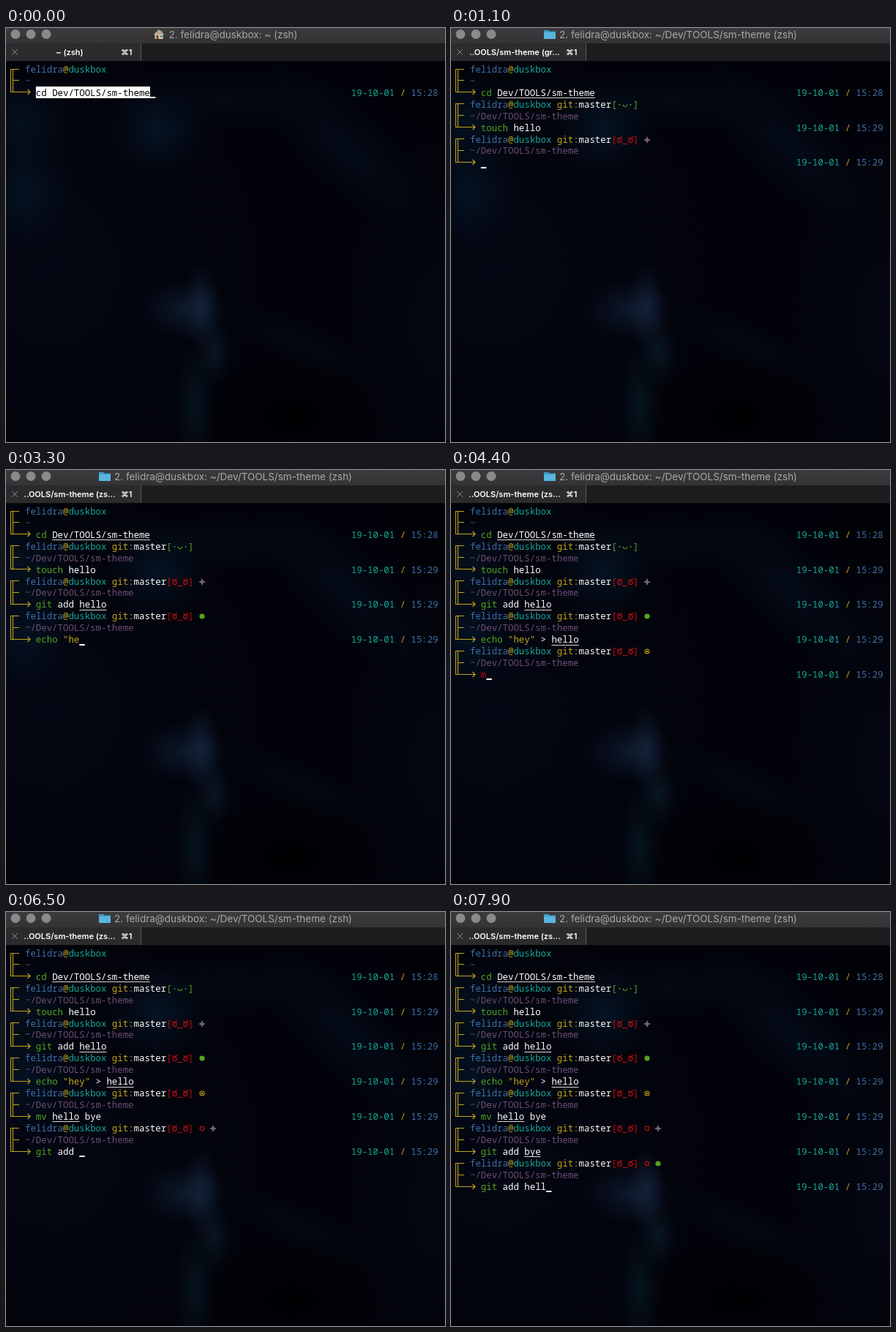
Recreate the animation shown at these times as an HTML page with a canvas. Size 600x566 px, loop 8 s.

```html
<!DOCTYPE html>
<html lang="en">
<head>
<meta charset="utf-8">
<title>Terminal session</title>
<style>
html, body { margin: 0; height: 100%; overflow: hidden; background: #02030a; }
canvas { display: block; }
</style>
</head>
<body>
<canvas id="stage" width="600" height="566"></canvas>
<script>
const ctx = document.getElementById('stage').getContext('2d');
const LOOP = 8000, CELL = 7.43, LEFT = 3.7, ROW = 15.95;
const MONO = '12.38px "Noto Sans Mono", monospace';
const USER = 'felidra', HOST = 'duskbox', DIR = '~/Dev/TOOLS/sm-theme';
const C = {
  blue: '#3f6fa9', teal: '#1aa698', green: '#53a51c', yellow: '#c0a51c',
  purple: '#6b4f76', red: '#bd1010', white: '#fff'
};

// at: when the prompt appears; keys: [time, characters typed]; file: path that gets underlined
const session = [
  { at: 0, cmd: 'cd Dev/TOOLS/sm-theme', keys: [[0, 21]], file: 'Dev/TOOLS/sm-theme' },
  { at: 200, cmd: 'touch hello', keys: [[200, 0], [1000, 11]], marks: [] },
  { at: 1100, cmd: 'git add hello', keys: [[1200, 0], [1800, 10], [2100, 13]], file: 'hello', marks: ['star'] },
  { at: 2200, cmd: 'echo "hey" > hello', keys: [[2400, 0], [3300, 8], [4100, 18]], file: 'hello', marks: ['dot'] },
  { at: 4200, cmd: 'mv hello bye', keys: [[4300, 0], [4400, 1], [5400, 12]], file: 'hello', marks: ['target'] },
  { at: 5600, cmd: 'git add bye', keys: [[5800, 0], [6300, 7], [6400, 7], [6500, 8], [7000, 11]], file: 'bye', marks: ['ring', 'star'] },
  { at: 7200, cmd: 'git add hello', keys: [[7300, 0], [7900, 12]], marks: ['ring', 'dot'] }
];

const colX = col => LEFT + col * CELL;
const baseline = row => Math.round(60.8 + row * ROW);
const cellBottom = row => Math.round(64.1 + row * ROW);

function rect(x, y, w, h, color) {
  ctx.fillStyle = color;
  ctx.fillRect(x, y, w, h);
}

function circle(x, y, r, color, stroked) {
  ctx.beginPath();
  ctx.arc(x, y, r, 0, Math.PI * 2);
  ctx.fillStyle = ctx.strokeStyle = color;
  stroked ? ctx.stroke() : ctx.fill();
}

function lines(color, ...paths) {
  ctx.strokeStyle = color;
  ctx.beginPath();
  for (const path of paths) {
    path.forEach(([x, y], i) => i ? ctx.lineTo(x, y) : ctx.moveTo(x, y));
  }
  ctx.stroke();
}

function label(str, x, y, font, color, align = 'left') {
  ctx.font = font;
  ctx.fillStyle = color;
  ctx.textAlign = align;
  ctx.fillText(str, x, y);
}

// Prints [text, color] runs from a column.
function print(col, row, ...runs) {
  for (const [str, color] of runs) {
    label(str, colX(col), baseline(row), MONO, color);
    col += str.length;
  }
}

function glow(x, y, rx, ry, color, alpha, angle = 0) {
  ctx.save();
  ctx.translate(x, y);
  ctx.rotate(angle);
  ctx.scale(rx, ry);
  const g = ctx.createRadialGradient(0, 0, 0, 0, 0, 1);
  g.addColorStop(0, `rgba(${color},${alpha})`);
  g.addColorStop(0.5, `rgba(${color},${alpha * 0.45})`);
  g.addColorStop(1, `rgba(${color},0)`);
  rect(-1, -1, 2, 2, g);
  ctx.restore();
}

function drawBackground() {
  rect(0, 0, 600, 566, '#02030a');
  glow(60, 330, 300, 330, '5,8,24', 0.6);
  glow(590, 400, 130, 260, '5,8,22', 0.6);
  glow(390, 530, 130, 80, '0,0,2', 0.9);
  glow(590, 80, 90, 60, '0,0,2', 0.7);
  glow(25, 225, 70, 80, '5,24,42', 0.7);
  glow(20, 130, 75, 70, '6,22,38', 0.7);
  glow(208, 138, 68, 65, '6,25,44', 0.75);
  glow(300, 100, 180, 40, '6,15,30', 0.5);
  glow(465, 165, 160, 55, '5,16,32', 0.65, 0.75);
  glow(245, 385, 62, 42, '18,36,60', 0.65);
  glow(267, 382, 26, 62, '24,42,68', 0.65);
  glow(284, 442, 25, 48, '14,38,54', 0.55);
  glow(258, 515, 28, 90, '9,30,44', 0.6);
  glow(400, 430, 130, 30, '7,13,28', 0.5, 0.4);
}

function drawFolder(x) {
  rect(x, 3, 7, 4, '#3f9cc6');
  rect(x, 4.5, 16, 10, '#3f9cc6');
  rect(x, 6, 16, 9, '#59b5dc');
}

function drawHouse(x) {
  rect(x + 2, 8, 11, 7, '#d8cfae');
  rect(x + 10, 3, 2, 4, '#a06a4c');
  ctx.fillStyle = '#b9a58a';
  ctx.beginPath();
  ctx.moveTo(x, 9);
  ctx.lineTo(x + 7.5, 2);
  ctx.lineTo(x + 15, 9);
  ctx.fill();
  rect(x + 4, 10, 3, 5, '#6b4630');
  rect(x + 9, 10, 3, 3, '#5a8fae');
}

function drawChrome(path, job) {
  const bar = ctx.createLinearGradient(0, 0, 0, 20);
  bar.addColorStop(0, '#3c3a3c');
  bar.addColorStop(1, '#353335');
  rect(0, 0, 600, 21, bar);
  rect(0, 21, 600, 25, '#1d1c1e');
  rect(0, 21, 184, 24, '#2b2a2c');
  rect(184, 21, 1, 24, '#59575a');
  rect(0, 45, 600, 1, '#0b0b0d');
  for (const x of [13, 34, 55]) circle(x, 8.5, 6.5, '#8b898b');

  const title = `2. ${USER}@${HOST}: ${path} (zsh)`;
  const font = '13.5px Inter, sans-serif';
  ctx.font = font;
  const x = 300 - (ctx.measureText(title).width + 21) / 2;
  (path === '~' ? drawHouse : drawFolder)(x);
  label(title, x + 21, 14, font, '#a9a7a9');

  const tabFont = '600 11px Inter, "DejaVu Sans", sans-serif';
  const tab = path === '~' ? '~ (zsh)' : `..OOLS/sm-theme (${job}...`;
  label(tab, 87, 37, tabFont, C.white, 'center');
  label('⌘1', 157, 37, tabFont, C.white);
  ctx.lineWidth = 1;
  lines('#88868a', [[8, 29], [16, 37]], [[16, 29], [8, 37]]);
}

function drawFrame(row) {
  const [top, mid, low] = [0, 1, 2].map(i => Math.round(56.5 + (row + i) * ROW) - 0.5);
  ctx.lineWidth = 1.1;
  lines(C.yellow,
    [[18, top], [6.5, top], [6.5, low], [33, low]],
    [[9.5, top], [9.5, low]],
    [[9.5, mid], [18, mid]],
    [[29.5, low - 3.5], [33, low], [29.5, low + 3.5]]);
}

function drawFace(row, happy) {
  const y = baseline(row) - 4, color = happy ? C.green : C.red;
  print(29, row, ['[', color]);
  print(33, row, [']', color]);
  ctx.lineWidth = 1.1;
  for (const x of [230.5, 245.5]) {
    if (happy) { circle(x, y, 0.9, color); continue; }
    circle(x, y + 0.8, 2.8, color, true);
    circle(x, y + 0.8, 0.8, color);
    lines(color, [[x - 3, y - 3.5], [x, y - 2], [x + 3.5, y - 4.5]]);
  }
  if (happy) {
    ctx.beginPath();
    ctx.arc(238, y - 0.5, 3, 0.1, Math.PI - 0.1);
    ctx.stroke();
  } else {
    print(31, row, ['_', color]);
  }
}

const marks = {
  star(x, y) {
    ctx.fillStyle = '#78617f';
    ctx.beginPath();
    for (let i = 0; i < 8; i++) {
      const r = i % 2 ? 2.1 : 5.2, a = i * Math.PI / 4;
      ctx.lineTo(x + r * Math.cos(a), y + r * Math.sin(a));
    }
    ctx.fill();
  },
  dot(x, y) { circle(x, y, 3.6, C.green); },
  ring(x, y) { circle(x, y, 2.9, C.red, true); },
  target(x, y) {
    circle(x, y, 3, C.yellow, true);
    circle(x, y, 1.3, C.yellow);
  }
};

function typedCount(keys, time) {
  let [t0, n0] = keys[0];
  for (const [t1, n1] of keys) {
    if (time < t1) return Math.round(n0 + (n1 - n0) * Math.max(0, time - t0) / (t1 - t0));
    [t0, n0] = [t1, n1];
  }
  return n0;
}

function drawCommand({ cmd, file }, text, row) {
  const known = cmd.split(' ')[0];
  let col = 5;
  text.split(' ').forEach((word, i) => {
    const color = i === 0 ? (word === known ? C.green : C.red)
      : word[0] === '"' ? C.yellow : C.white;
    print(col, row, [word, color]);
    if (i && word && file && file.startsWith(word)) {
      rect(colX(col), cellBottom(row) - 1, word.length * CELL, 1, '#d8d8d8');
    }
    col += word.length + 1;
  });
}

function drawPrompt(entry, index, time, active) {
  const row = index * 3, text = entry.cmd.slice(0, typedCount(entry.keys, time));
  drawFrame(row);
  print(3, row, [USER, C.blue], ['@', C.yellow], [HOST, C.teal]);
  print(3, row + 1, [index ? DIR : '~', C.purple]);
  if (index) {
    print(19, row, ['git:', C.yellow], ['master', C.white]);
    drawFace(row, index === 1);
    entry.marks.forEach((name, i) => marks[name](268 + i * 15, baseline(row) - 4));
  }

  const bottom = cellBottom(row + 2);
  if (time < 100) {
    rect(colX(5), bottom - 16, text.length * CELL, 16, C.white);
    print(5, row + 2, [text, '#000']);
  } else {
    drawCommand(entry, text, row + 2);
  }
  if (active) rect(colX(5 + text.length), bottom - 2, CELL, 2, C.white);
  print(63, row + 2, ['19-10-01', C.teal], [' / ', C.yellow], [index ? '15:29' : '15:28', C.blue]);
}

function render(now) {
  const time = Math.floor(now % LOOP / 100) * 100;
  const shown = session.filter(entry => entry.at <= time);
  const last = shown.length - 1;
  drawBackground();
  drawChrome(last ? DIR : '~', time < shown[last].at + 100 ? 'gr' : 'zs');
  shown.forEach((entry, i) => drawPrompt(entry, i, time, i === last));
}

const start = performance.now();
function tick() {
  render(performance.now() - start);
  requestAnimationFrame(tick);
}
tick();
</script>
</body>
</html>
```
